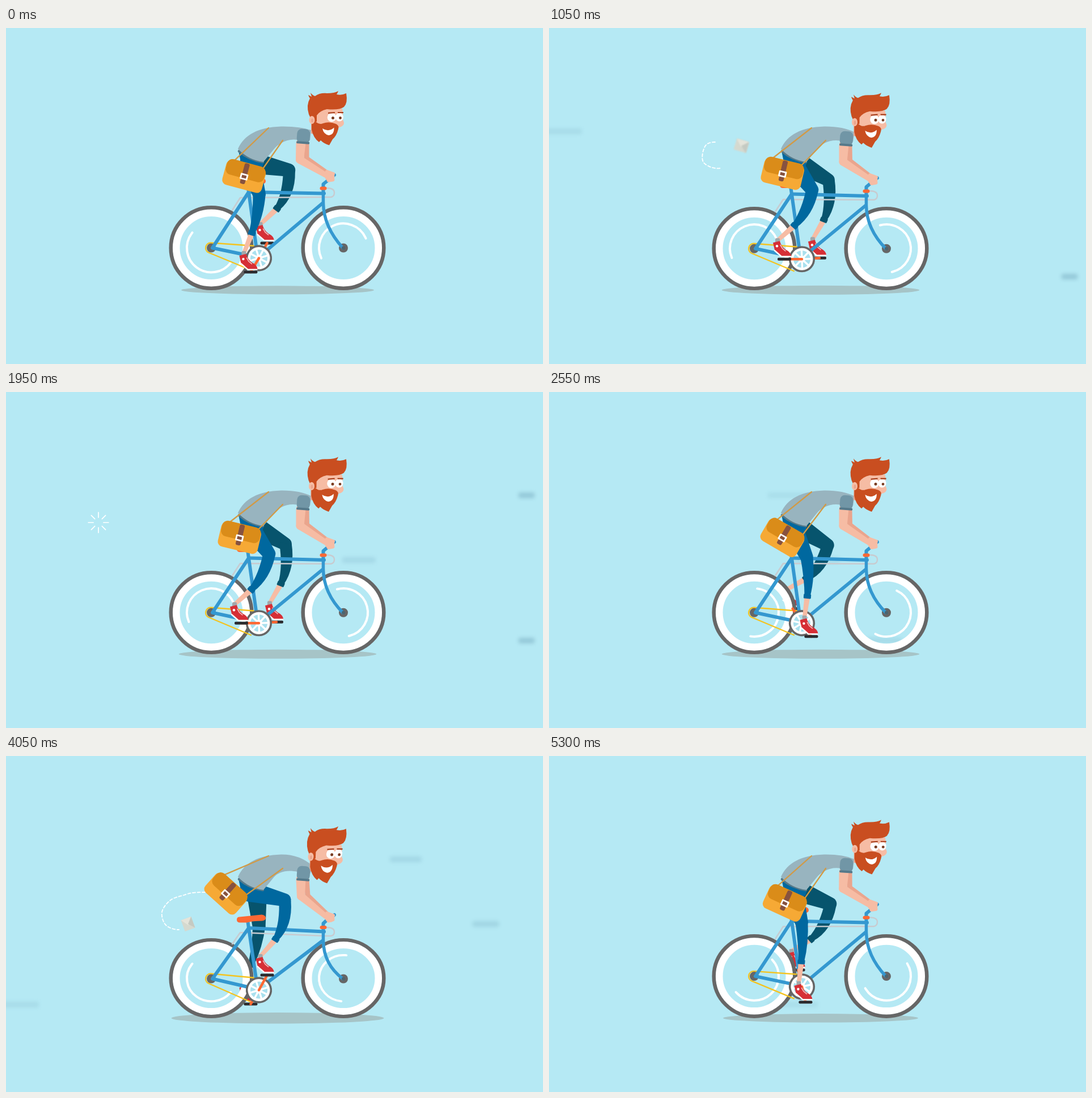
These frames come from a looping animation (947x592 px, 5.35 s). An HTML page with a canvas:

```html
<!DOCTYPE html>
<html lang="en">
<head>
<meta charset="utf-8">
<title>Courier on a bike</title>
<style>
html, body { margin: 0; width: 100%; height: 100%; overflow: hidden; background: #b5e9f4; }
canvas { display: block; }
</style>
</head>
<body>
<canvas id="stage" width="947" height="592"></canvas>
<script>
const ctx = document.getElementById('stage').getContext('2d');
const LOOP = 5350, STEP = 50, GROUND = 462, TAU = Math.PI * 2;
const SKY = '#b5e9f4', BLUE = '#3498d0', SKIN = '#f6bca4', SKIN_DARK = '#eaa58d',
  ORANGE = '#ff6833', GREY = '#666', HAIR = '#c94e20', WHITE = '#fff';
// Hip joint, thigh length and where the trouser leg starts
const NEAR = { x: 428, y: 226, thigh: 69, root: { x: 430, y: 239 }, color: '#00689f' };
const FAR = { x: 438, y: 238, thigh: 62, root: { x: 442, y: 239 }, color: '#07546d' };
const SHIN = 108;
const rad = d => d * Math.PI / 180;
const mix = (a, b, k) => a + (b - a) * k;

// w goes from 0 (suspension up) to 1 (pressed down)
let w = 0;
const sag = (up, down) => mix(up, down, w);

function fill(d, color) {
  ctx.fillStyle = color;
  ctx.fill(new Path2D(d));
}
function line(d, color, width, cap = 'round') {
  ctx.strokeStyle = color;
  ctx.lineWidth = width;
  ctx.lineCap = cap;
  ctx.lineJoin = 'round';
  ctx.stroke(new Path2D(d));
}
function disc(x, y, rx, color, ry = rx) {
  ctx.beginPath();
  ctx.ellipse(x, y, rx, ry, 0, 0, TAU);
  ctx.fillStyle = color;
  ctx.fill();
}
function ring(r, color, width, from = 0, to = TAU) {
  ctx.beginPath();
  ctx.arc(0, 0, r, from, to);
  ctx.strokeStyle = color;
  ctx.lineWidth = width;
  ctx.lineCap = 'round';
  ctx.stroke();
}
function box(x, y, bw, bh, r, color) {
  ctx.beginPath();
  ctx.roundRect(x, y, bw, bh, r);
  ctx.fillStyle = color;
  ctx.fill();
}
function limb(a, ra, b, rb, color) {
  const dx = b.x - a.x, dy = b.y - a.y;
  const dir = Math.atan2(dy, dx), open = Math.acos((ra - rb) / Math.hypot(dx, dy));
  ctx.beginPath();
  ctx.arc(a.x, a.y, ra, dir + open, dir - open + TAU);
  ctx.arc(b.x, b.y, rb, dir - open, dir + open);
  ctx.fillStyle = color;
  ctx.fill();
}
function at(x, y, turn, draw) {
  ctx.save();
  ctx.translate(x, y);
  ctx.rotate(turn);
  draw();
  ctx.restore();
}
// Value at t in a list of [time, value]
function keyed(keys, t) {
  if (t <= keys[0][0]) return keys[0][1];
  for (let i = 1; i < keys.length; i++) {
    const [t0, v0] = keys[i - 1], [t1, v1] = keys[i];
    if (t <= t1) return mix(v0, v1, (t - t0) / (t1 - t0));
  }
  return keys[keys.length - 1][1];
}

// Wind streaks
const WIND_X = [950, 918, 828, 705, 590, 430, 215, 22, -90].map((x, i) => [i, x]);
const WIND = [
  { y: 182, first: 250, gap: 400, last: 250 },
  { y: 182, first: 700, gap: 400, last: 4700 },
  { y: 296, first: 1215, gap: 549, last: 4700 },
  { y: 438, first: 100, gap: 450, last: 5050 }
];
function wind(t) {
  ctx.save();
  ctx.filter = 'blur(3px)';
  for (const { y, first, gap, last } of WIND) {
    for (let start = first; start <= last; start += gap) {
      const s = (t - start) / STEP;
      if (s < 0 || s > 8) continue;
      const speed = keyed(WIND_X, s - .5) - keyed(WIND_X, s + .5);
      const long = Math.max(24, speed * .47);
      ctx.globalAlpha = Math.min(.4, 9 / long);
      box(keyed(WIND_X, s) - long / 2, y - 5, long, 10, 4, '#4f86a0');
    }
  }
  ctx.restore();
}

// Letters flying out of the bag
const LETTERS = [
  {
    pts: [[385,240],[355,235],[334,229],[310,204],[278,205],[272,236],[303,247],[333,222],
      [339,194],[318,177],[297,197],[275,240],[246,257],[200,255],[163,230]],
    paper: [[450,0],[600,3],[1500,12],[1750,14]],
    head: [[500,0],[600,2],[1500,10],[1800,14]],
    tail: [[550,.4],[600,1],[1500,6],[1850,14]],
    wide: [[600,22],[1500,23]], tall: [[600,14],[1500,26]], turn: [[600,.42],[1500,.16]],
    blur: [[600,.5],[1000,1],[1500,2.2]], pop: 1750
  },
  {
    pts: [[375,240],[351,240],[329,241],[314,245],[290,254],[275,275],[282,298],[305,306],
      [321,296],[325,262],[290,225],[235,215],[170,250]],
    paper: [[3050,0],[3150,3],[4050,8],[4400,12]],
    head: [[3100,0],[3150,2],[4050,7],[4450,12]],
    tail: [[3100,.5],[3150,1],[4050,1],[4500,12]],
    wide: [[3150,14],[4050,19]], tall: [[3150,15],[4050,21]], turn: [[3150,.1],[4050,-.35]],
    blur: [[3150,.5],[4050,.4],[4300,2]], pop: 4400
  }
];
function along(pts, u) {
  const i = Math.min(Math.floor(u), pts.length - 2), k = u - i;
  const p = j => pts[Math.max(0, Math.min(pts.length - 1, i + j))];
  return [0, 1].map(c => {
    const a = p(-1)[c], b = p(0)[c], d = p(1)[c], e = p(2)[c];
    return b + .5 * k * (d - a + k * (2 * a - 5 * b + 4 * d - e + k * (3 * (b - d) + e - a)));
  });
}
function letter(m, t) {
  const end = m.pts.length - 1, from = keyed(m.tail, t), to = keyed(m.head, t);
  if (t > m.paper[0][0] && to > from) {
    ctx.save();
    ctx.beginPath();
    for (let u = from; u < to; u += .1) ctx.lineTo(...along(m.pts, u));
    ctx.lineTo(...along(m.pts, to));
    ctx.setLineDash([5, 3.5]);
    ctx.strokeStyle = WHITE;
    ctx.lineWidth = 1.8;
    ctx.stroke();
    ctx.restore();
  }
  const u = keyed(m.paper, t);
  if (u > 0 && u < end) {
    const [x, y] = along(m.pts, u);
    const a = keyed(m.wide, t), b = keyed(m.tall, t);
    at(x, y, keyed(m.turn, t), () => {
      ctx.filter = `blur(${keyed(m.blur, t)}px)`;
      box(-a / 2, -b / 2, a, b, 1, '#d5d9cf');
      fill(`M${-a / 2},${-b / 2}H${a / 2}L0,${b * .12}Z`, '#e4e4da');
      fill(`M${a / 2},${-b / 2}V${b / 2}L0,0Z`, '#c5cac2');
    });
  }
  const age = t - m.pop;
  if (age >= 0 && age <= 300) {
    const outer = mix(7, 20, Math.min(1, age / 240)), inner = age <= 200 ? outer * .5 : mix(9, 19, (age - 200) / 100);
    at(...m.pts[end], 0, () => {
      for (let i = 0; i < 8; i++) {
        line(`M0,${inner}V${outer}`, WHITE, 1.7);
        ctx.rotate(TAU / 8);
      }
    });
  }
}

function wheel(x, turn) {
  const ry = sag(74.5, 70.5);
  ctx.save();
  ctx.translate(x, GROUND - ry);
  ctx.scale(1, ry / 74.5);
  ring(62, WHITE, 13);
  ring(71.3, GREY, 6.5);
  ring(43, WHITE, 4, rad(turn), rad(turn + 182));
  ctx.restore();
}

function solveLeg(hip, pedal) {
  const ankle = { x: pedal.x - 12, y: pedal.y - 33 };
  const dx = ankle.x - hip.x, dy = ankle.y - hip.y, d = Math.hypot(dx, dy);
  const a = Math.min(hip.thigh, (d * d + hip.thigh ** 2 - SHIN ** 2) / (2 * d));
  const bend = Math.sqrt(hip.thigh ** 2 - a * a);
  const knee = { x: hip.x + (dx * a + dy * bend) / d, y: hip.y + (dy * a - dx * bend) / d };
  return { ankle, knee, bend };
}
function leg(hip, pedal) {
  const { ankle, knee, bend } = solveLeg(hip, pedal), { color } = hip;
  const sx = ankle.x - knee.x, sy = ankle.y - knee.y, len = Math.hypot(sx, sy);
  const dir = { x: sx / len, y: sy / len }, front = { x: dir.y, y: -dir.x };
  const pt = (down, out) => `${knee.x + dir.x * down + front.x * out},${knee.y + dir.y * down + front.y * out}`;
  const push = bend * .22;
  const cuff = { x: knee.x + dir.x * 70 + front.x * push, y: knee.y + dir.y * 70 + front.y * push };

  limb(cuff, 5, ankle, 3.5, SKIN);
  at(ankle.x, ankle.y, 0, shoe);
  limb(hip.root, 18, knee, 11.5, color);
  fill(`M${pt(-3, 11)}Q${pt(36, 10 + push * 1.7)} ${pt(70, push + 5)}L${pt(70, push - 5)}Q${pt(40, push * 1.3 - 7)} ${pt(0, -11)}Z`, color);
  at(cuff.x, cuff.y, Math.atan2(dir.y, dir.x) - Math.PI / 2 + push * .012, () => box(-6.5, -4, 13, 8, 1.5, color));
}
function shoe() {
  box(-4, -4, 8, 10, 2, '#a2a7aa');
  fill('M-8,4L4,1Q6,10 14,16Q24,21 24,28H8L-5,17Z', '#d62f36');
  line('M-5,18L7,28.5H23', WHITE, 2.4);
  line('M5,8L8.5,14L14,18.5', '#f3c3c2', 1.6);
  disc(-1, 10, 2.2, WHITE);
}
function pedalBar(p) {
  box(p.x - 12, p.y - 2.5, 24, 5, 2, '#2b2b2e');
}

function bikeFrame(bb) {
  const hub = sag(387.5, 392.5), seatY = sag(289, 303), headY = sag(291.5, 309.5), low = sag(308, 325);
  line(`M446,${bb - 21}L361,${hub - 9}A9,9 0 0 0 357,${hub + 8}L432,${bb + 21}`, '#f4c31f', 2.4);
  disc(362, hub, 8, GREY);
  disc(595, hub, 8, GREY);
  line(`M399,${sag(321, 331)}L413,${sag(299, 311)}L562,${sag(298, 317)}H573Q579,${sag(297, 316)} 579,${sag(290, 310)}Q579,${sag(282, 302)} 565,${sag(282, 302)}`, '#c8cbd0', 2.4);
  line(`M364,${hub}L428,${seatY}M364,${hub}L446,${bb - 1}`, BLUE, 6);
  line(`M426,${seatY - 14}L428,${seatY}L444,${bb}`, BLUE, 6);
  line(`M428,${seatY}L561,${headY}M559,${low}L447,${bb - 3}`, BLUE, 6);
  line(`M559.5,${headY}V${low}Q560,${low + 42} 594,${hub}`, BLUE, 5.5);
  line(`M559.5,${headY}V${sag(275, 295)}L567,${sag(269, 288)}L579,${sag(259, 280)}`, BLUE, 6);
  disc(595, hub, 3, '#4b6570');
  box(553.5, sag(279.5, 299), 12, 6, 3, ORANGE);
  const y = sag(270, 285.5);
  fill(`M412,${y - 2}L451,${y - 6}Q458,${y - 5} 458,${y}Q458,${y + 4} 452,${y + 5}Q434,${y + 5} 425,${y + 8}H413Q407,${y + 8} 407,${y + 3}Q407,${y - 2} 412,${y - 2}Z`, ORANGE);
}
function chainring(bb, turn) {
  at(446, bb, turn, () => {
    disc(0, 0, 22, WHITE);
    disc(0, 0, 15, '#a9e0ee');
    for (let i = 0; i < 8; i++) {
      line('M4,0H16', WHITE, 3.4, 'butt');
      ctx.rotate(TAU / 8);
    }
    disc(0, 0, 6, WHITE);
    ring(21.3, GREY, 3.6);
  });
}

function torso() {
  line('M411,217Q428,232 453,236', '#54798a', 4.5);
  fill(`M409,213C420,188 445,175 485,173.5Q518,173 ${sag(538, 541)},${sag(180, 194)}L536,${sag(198, 208)}L514,${sag(197, 204)}C496,${sag(194, 200)} 480,204 472,214L454,236Q428,233 409,213Z`, '#98b4bf');
}
function bag(phase) {
  const c = Math.cos(rad(phase)), x = 404 + 16 * c, y = 251.5 + 9.5 * c;
  const turn = rad(28.5 - 16.5 * Math.cos(rad(phase - 36)));
  const cos = Math.cos(turn), sin = Math.sin(turn);
  const spot = (a, b) => `${x + a * cos - b * sin},${y + a * sin + b * cos}`;
  line(`M463,176L${spot(-25, -20)}M488,198L${spot(28, -20)}`, '#d29a45', 2.3);
  at(x, y, turn, () => {
    box(-36, -21, 72, 44, 9, '#f6a935');
    box(-35, -24, 70, 28, 10, '#da8c19');
    box(-4.5, -23, 9, 37, 3, '#87523f');
    ctx.strokeStyle = WHITE;
    ctx.lineWidth = 2.8;
    ctx.strokeRect(-5.5, -3, 11, 8);
  });
}
function farArm() {
  line(`M530,${sag(204, 217)}L${sag(530, 532)},${sag(230, 246)}L568,${sag(257, 281)}`, SKIN_DARK, 9);
}
function nearArm() {
  const shoulder = { x: 520, y: sag(203, 217) }, elbow = { x: sag(518, 520), y: sag(232, 247) };
  limb(shoulder, 8.5, elbow, 7, SKIN);
  limb(elbow, 7, { x: 567, y: sag(261, 285) }, 4.5, SKIN);
  disc(571, sag(262, 285), 8.5, SKIN, 8);
  line(`M566,${sag(253, 277)}L577,${sag(257, 281)}`, SKIN, 6);
  line(`M569,${sag(268, 290)}L576,${sag(267, 288)}`, SKIN, 7);
  at(524.5, sag(191, 207), .07, () => {
    box(-11.5, -13, 23, 25, 8, '#7196a6');
    box(-11.5, 9, 23, 4, 1.5, '#55798a');
  });
}
function head() {
  ctx.save();
  ctx.translate(0, 112 + 13 * w);
  ctx.transform(1, 0, -.04 * w, 1 + .05 * w, 0, 0);
  ctx.translate(0, -112);
  fill('M538,160H558L556,188L538,186Z', SKIN_DARK);
  fill('M543,142H593Q595,155 594,162Q600,171 588,175L560,182L543,168Z', SKIN);
  disc(588.5, 168.5, 6, SKIN, 5.5);
  fill('M545,164Q552,171 559,168Q570,164 582,169Q588,172 586,178Q583,190 576,196L570,206.5Q561,204 555,198L552,201Q542,194 539,179L539,165Z', HAIR);
  fill('M534,152Q529,136 536,124Q534,121 533,118L539,121L537,114Q541,119 545,120Q553,114 566,115Q580,115 586,111Q585,114 583,117Q592,119 600,115Q603,132 596,139Q588,145 566,143Q553,146 548,154V165H540Z', HAIR);
  disc(539.5, 162, 5, SKIN, 7);
  disc(540, 163, 2, SKIN_DARK, 3.5);
  disc(588, 157, 7, WHITE, 7.6);
  disc(574.5, 157.4, 7.8, WHITE, 8);
  disc(576.5, 158.5, 2.5, '#7a3c20');
  disc(589.5, 158.5, 2.4, '#7a3c20');
  line('M568,149.8L580,149M585,149H595', '#a83c18', 2.2, 'butt');
  fill('M558,177Q569,184 578.5,175.5Q579,188 569,189Q560,187 558,177Z', WHITE);
  ctx.restore();
}

function draw(t) {
  const step = Math.floor(t / STEP), phase = step * 20 % 360;
  t = step * STEP;
  w = (1 - Math.cos(rad(phase))) / 2;
  const bb = sag(405.5, 412.5), turn = rad(118 + phase);
  const px = 31 * Math.cos(turn), py = 29 * Math.sin(turn);
  const near = { x: 446 + px, y: bb + py - 1 }, far = { x: 446 - px, y: bb - py - 1 };

  ctx.fillStyle = SKY;
  ctx.fillRect(0, 0, 947, 592);
  wind(t);
  disc(479, 461.8, sag(170, 187.5), '#a6c4c7', sag(7.5, 9.7));
  LETTERS.forEach(m => letter(m, t));

  leg(FAR, far);
  pedalBar(far);
  wheel(362, 37 + step * 40);
  wheel(595, 155 + (step % 18) * 100 / 3);
  bikeFrame(bb);
  line(`M446,${bb}L${far.x},${far.y}`, ORANGE, 4.5);
  chainring(bb, turn);
  line(`M446,${bb}L${near.x},${near.y}`, ORANGE, 4.5);

  pedalBar(near);
  leg(NEAR, near);
  fill('M410,216L455,235L452,246L425,252L414,236Z', NEAR.color);
  farArm();
  torso();
  bag(phase);
  head();
  nearArm();
}

const began = performance.now();
function tick() {
  draw((performance.now() - began) % LOOP);
  requestAnimationFrame(tick);
}
tick();
</script>
</body>
</html>
```
